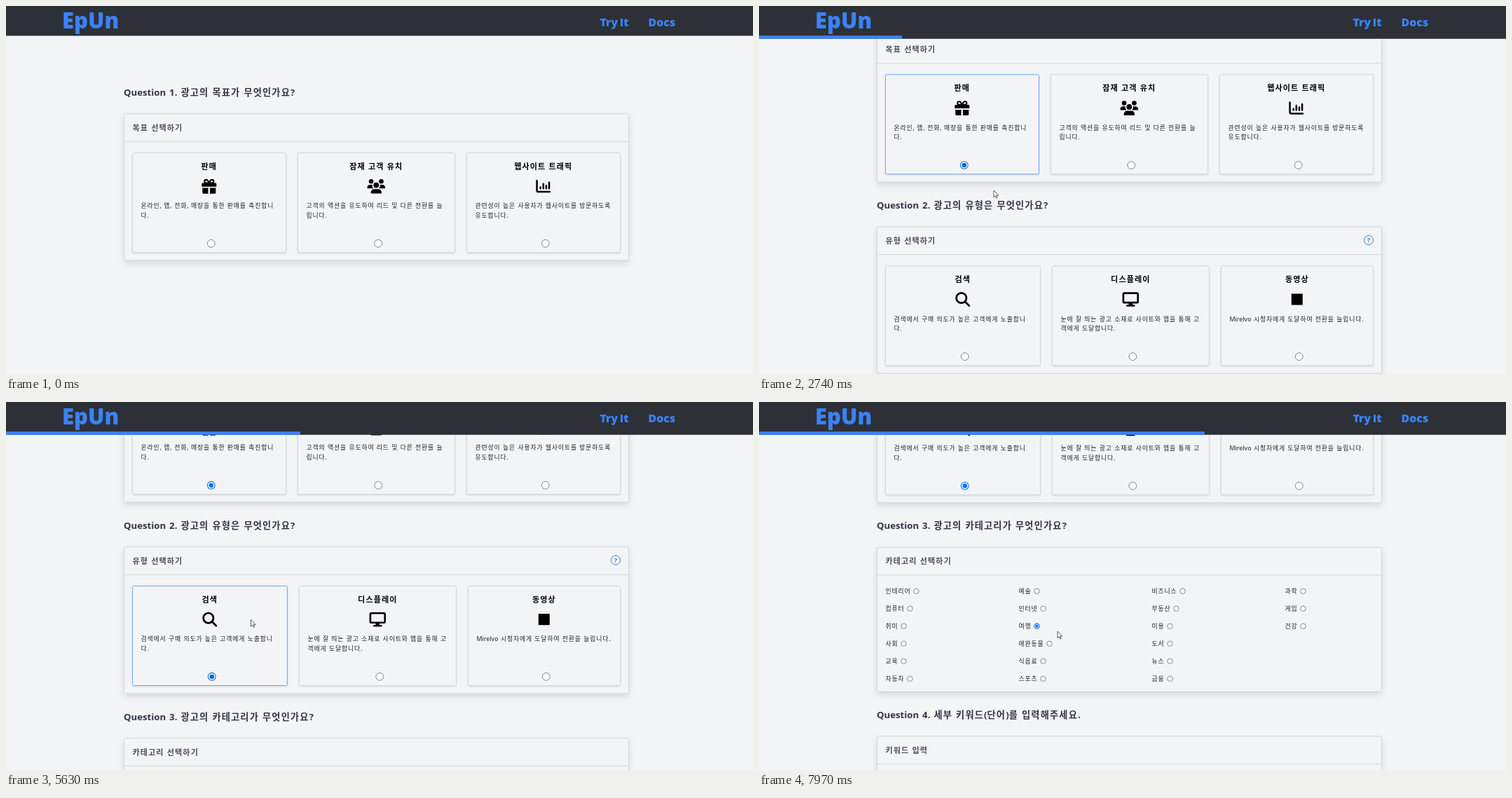
An HTML page for the animation above (8 s loop, 1066 by 525 pixels).

```html
<!DOCTYPE html>
<html lang="ko">
<head>
<meta charset="utf-8">
<title>Ad script survey</title>
<style>
html, body { margin: 0; width: 100%; height: 100%; overflow: hidden; background: #f3f4f6; }
svg { display: block; }
text { font-family: "Noto Sans", "Noto Sans CJK KR", sans-serif; word-spacing: .12em; white-space: pre; }
.ko { letter-spacing: .096em; }
.heading { font-size: 13.2px; font-weight: 600; fill: #2d3748; }
.heading .ko { letter-spacing: .09em; }
.title { font-size: 11.1px; font-weight: 600; fill: #465060; }
.name { font-size: 11.1px; font-weight: 700; text-anchor: middle; }
.body { font-size: 8.88px; fill: #1f2328; }
.box { fill: #f3f4f6; stroke: #d5d8dd; }
.panel { filter: drop-shadow(0 4px 4px rgba(0,0,0,.11)); }
.card .box { filter: drop-shadow(0 1.5px 1.2px rgba(0,0,0,.12)); }
.card.hover .box { stroke: #6ea9f7; }
.ring { fill: #fff; stroke: #767676; stroke-width: .9; }
.dot { fill: #0075ff; display: none; }
.on .ring { stroke: #0075ff; stroke-width: 1.1; }
.on .dot { display: inline; }
.hover .on .ring { stroke: #1168d4; }
.hover .on .dot { fill: #1168d4; }
.line { fill: none; stroke: #000; stroke-linecap: round; stroke-linejoin: round; }
.brand { font-family: "Open Sans", "Noto Sans", sans-serif; font-weight: 800; word-spacing: -.1em; fill: #3b82f6; }
</style>
</head>
<body>
<svg id="stage" width="1066" height="525" viewBox="0 0 1066 525"></svg>
<script>
const LOOP = 8000;
const TOPS = [0, 273, 546, 815.5];
const FOOTER_TOPS = [658.5, 658.5, 928.5, 1198.5];

const ICONS = {
  gift: `<path d="M-9.2-4.6H9.2Q10.5-4.6 10.5-3.3V.6H-10.5V-3.3Q-10.5-4.6-9.2-4.6ZM-9.5 2.4H-1.3V10.5H-8Q-9.5 10.5-9.5 9ZM1.3 2.4H9.5V9Q9.5 10.5 8 10.5H1.3Z"/>
    <path class="line" stroke-width="2.1" d="M0-4.6H-4.2A2.3 2.3 0 0 1-4.2-9.3Q-2-9.5 0-4.6Q2-9.5 4.2-9.3A2.3 2.3 0 0 1 4.2-4.6Z"/>`,
  users: `<circle cx="-7.2" cy="-6.9" r="3.3"/><circle cx="7.2" cy="-6.9" r="3.3"/><circle cy="-1.6" r="3.9"/>
    <path d="M-12.8 2.2Q-12.8-2.3-8.5-2.3H-5.6Q-6 .6-4 3H-12Q-12.8 3-12.8 2.2ZM12.8 2.2Q12.8-2.3 8.5-2.3H5.6Q6 .6 4 3H12Q12.8 3 12.8 2.2ZM-7.7 9.4Q-7.5 4-2.5 4H2.5Q7.5 4 7.7 9.4Q7.7 10.4 6.7 10.4H-6.7Q-7.7 10.4-7.7 9.4Z"/>`,
  chart: `<path class="line" stroke-width="2.5" d="M-9.2-7.9V5.8Q-9.2 7.9-7.1 7.9H9.2M-4.2 3V1.2M0 3V-3.4M4.2 3V-1M8.3 3V-5.4"/>`,
  search: `<path class="line" stroke-width="2.7" d="M5.2-2A7.2 7.2 0 1 1-9.2-2A7.2 7.2 0 1 1 5.2-2ZM3.2 3.2L9.1 9.1"/>`,
  screen: `<path class="line" stroke-width="2.6" d="M-9.2-8.9H9.2Q10.4-8.9 10.4-7.7V3.4Q10.4 4.6 9.2 4.6H-9.2Q-10.4 4.6-10.4 3.4V-7.7Q-10.4-8.9-9.2-8.9ZM-5 9H5"/>
    <path d="M-2.4 4H2.4L3 9H-3Z"/>`,
  square: `<rect x="-8" y="-8" width="16" height="16"/>`
};

const GOALS = [
  [180, 219, '판매', 'gift', '온라인, 앱, 전화, 매장을 통한 판매를 촉진합니', '다.'],
  [416, 224, '잠재 고객 유치', 'users', '고객의 액션을 유도하여 리드 및 다른 전환를 늘', '립니다.'],
  [657, 219, '웹사이트 트래픽', 'chart', '관련성이 높은 사용자가 웹사이트를 방문하도록', '유도합니다.']
];
const TYPES = [
  [180, 221, '검색', 'search', '검색에서 구매 의도가 높은 고객에게 노출합니', '다.'],
  [418, 224, '디스플레이', 'screen', '눈에 잘 띄는 광고 소재로 사이트와 앱을 통해 고', '객에게 도달합니다.'],
  [659, 217, '동영상', 'square', 'Mirelvo 시청자에게 도달하여 전환을 늘립니다.', '']
];
const CATEGORIES = [
  '인테리어 컴퓨터 취미 사회 교육 자동차',
  '예술 인터넷 여행 애완동물 식음료 스포츠',
  '비즈니스 부동산 미용 도서 뉴스 금융',
  '과학 게임 건강'
];

const text = (x, y, cls, str, attrs = '') =>
  `<text x="${x}" y="${y}" class="${cls}" ${attrs}>${str.replace(/[가-힣]+/g, '<tspan class="ko">$&</tspan>')}</text>`;
const rect = (x, y, w, h, attrs) => `<rect x="${x}" y="${y}" width="${w}" height="${h}" ${attrs}/>`;
const radio = (id, x, y, r) =>
  `<g id="radio-${id}"><circle class="ring" cx="${x}" cy="${y}" r="${r}"/><circle class="dot" cx="${x}" cy="${y}" r="${r * .62}"/></g>`;

function card(q, [x, w, name, icon, line1, line2], i) {
  const mid = x + w / 2 + .3;
  return `<g class="card" id="card-${q}-${i}">` +
    rect(x + .5, 209.5, w, 142, 'rx="2" class="box"') +
    text(mid, 233, 'name', name) +
    `<g transform="translate(${mid} 257.2)">${ICONS[icon]}</g>` +
    text(x + 12.5, 288.3, 'body', line1) + text(x + 12.5, 301.8, 'body', line2) +
    radio(`${q}-${i}`, mid + 3, 338.8, 5.4) + '</g>';
}

const categoryList = CATEGORIES.map((names, col) => names.split(' ').map((name, row) => {
  const x = 180.5 + col * 190, y = 216 + row * 25;
  return text(x, y + 3.3, 'body', name) + radio(`2-${col}-${row}`, x + 8 + 9 * name.length, y, 3.7);
}).join('')).join('');

const question = (q, heading, title, height, content) =>
  `<g id="question-${q}">` +
  text(168, 127.5, 'heading', `Question ${q + 1}. ${heading}`) +
  rect(168.5, 153.7, 720, height, 'rx="2" class="box panel"') +
  text(180.5, 177.6, 'title', title) +
  '<path d="M169 193.3H888" stroke="#d5d8dd"/>' + content + '</g>';

const help = '<circle cx="870" cy="172.7" r="6.6" fill="none" stroke="#3b82c8"/>' +
  text(870, 176.2, '', '?', 'text-anchor="middle" font-size="9.5" font-weight="600" fill="#3b82c8"');

const footer = '<g id="footer">' + rect(0, 0, 1066, 90, 'fill="#2d3037"') +
  text(1.5, 31.8, '', 'Automatically', 'font-size="15.9" font-weight="600" fill="#3b82f6"') +
  text(1.5, 50.5, '', 'generate advertising scripts', 'font-size="12.85" fill="#d7dae0"') +
  text(1.5, 71.5, '', 'using', 'font-size="12.85" fill="#3b82f6"') +
  text(39.5, 71.5, '', 'VelmORT', 'font-size="15.9" font-weight="600" fill="#3b82f6"') +
  '<path d="M207.5 14.5V74.5" stroke="#a3a7ae"/>' +
  text(241, 38.8, '', 'VelmORT 연동 프로젝트 입니다 :)', 'font-size="10.9" font-weight="600" fill="#eceef1"') +
  text(253, 62.5, '', 'Copyright 2023. Filrit All rights reserved.', 'font-size="7.7" fill="#eceef1"') + '</g>';

const header = rect(0, 0, 1066, 42.5, 'id="header" fill="#2d3037"') +
  rect(0, 42.2, 0, 4.6, 'id="bar" fill="#3b82f6"') +
  text(80, 32, 'brand', 'EpUn', 'font-size="31"') +
  text(847.5, 29, 'brand', 'Try It', 'font-size="15.9"') +
  text(916.5, 29, 'brand', 'Docs', 'font-size="15.9"');

document.getElementById('stage').innerHTML =
  rect(0, 0, 1066, 525, 'fill="#f3f4f6"') + '<g id="page">' +
  question(0, '광고의 목표가 무엇인가요?', '목표 선택하기', 209, GOALS.map((c, i) => card(0, c, i)).join('')) +
  question(1, '광고의 유형은 무엇인가요?', '유형 선택하기', 209, help + TYPES.map((c, i) => card(1, c, i)).join('')) +
  question(2, '광고의 카테고리가 무엇인가요?', '카테고리 선택하기', 205.5, categoryList) +
  question(3, '세부 키워드(단어)를 입력해주세요.', '키워드 입력', 209, '') +
  footer + '</g>' + header +
  '<path id="cursor" d="M0 0V9.8L2.3 7.7L3.8 11L5.2 10.4L3.8 7.1H6.8Z" fill="#fff" stroke="#30343a" stroke-width=".8"/>';

const $ = id => document.getElementById(id);
const clamp = v => Math.min(1, Math.max(0, v));
const smooth = v => v * v * (3 - 2 * v);
const easeOut = v => 1 - (1 - v) ** 2;
const linear = v => v;

// Interpolates rows of [time, ...values].
function track(keys, t, ease = linear) {
  const next = keys.findIndex(k => k[0] > t);
  if (next === 0) return keys[0].slice(1);
  if (next < 0) return keys[keys.length - 1].slice(1);
  const a = keys[next - 1], b = keys[next];
  const p = ease((t - a[0]) / (b[0] - a[0]));
  return a.slice(1).map((v, i) => v + (b[i + 1] - v) * p);
}

const CLICKS = [1880, 5220, 7450];
const CHECKED = ['0-0', '1-0', '2-1-2'];
const ENTER = [0, 1940, 5225, 7530];
const SCROLL = [[2430, 0], [2670, 111.7], [2740, 111.7], [2980, 167], [3220, 220],
  [5830, 220], [6070, 330], [6320, 490], [7529, 490], [7530, 492.2]];
const CURSOR = [[130, 1020, 518], [400, 850, 350], [640, 600, 290], [930, 402, 276], [970, 388, 272], [1110, 335, 263],
  [3640, 335, 263], [3950, 440, 300], [4300, 581, 328], [4840, 581, 328], [5020, 349.5, 310.5],
  [6320, 349.5, 310.5], [6560, 297, 315], [6609, 297, 315], [6610, 325, 330], [6640, 327, 332],
  [6880, 360, 344], [7120, 398, 330], [7320, 397, 320], [7600, 397, 320], [7900, 426, 327]];
const BAR = [[1880, 204], [5220, 204], [5470, 420], [7450, 420], [7700, 636]];
const HOVER = [[0, ''], [400, '0-2'], [585, ''], [605, '0-1'], [930, ''], [970, '0-0'], [2820, ''], [3260, '1-0'],
  [3840, ''], [3900, '1-1'], [4890, ''], [4990, '1-0'], [5900, '']];

const cards = [...document.querySelectorAll('.card')];

function draw(t) {
  const stage = CLICKS.filter(c => t >= c).length;
  const [scroll] = track(SCROLL, t, smooth);
  $('page').setAttribute('transform', `translate(0 ${-scroll})`);

  TOPS.forEach((top, q) => {
    const p = q ? easeOut(clamp((t - ENTER[q]) / 400)) : 1;
    $(`question-${q}`).setAttribute('transform', `translate(${-200 * (1 - p)} ${top})`);
    $(`question-${q}`).setAttribute('opacity', p);
  });
  CHECKED.forEach((id, i) => $(`radio-${id}`).classList.toggle('on', stage > i));

  const hovered = HOVER.filter(h => t >= h[0]).pop()[1];
  cards.forEach(c => c.classList.toggle('hover', c.id === `card-${hovered}`));

  $('footer').setAttribute('transform', `translate(0 ${FOOTER_TOPS[stage]})`);
  $('header').setAttribute('height', stage ? 46.8 : 42.5);
  $('bar').setAttribute('width', stage ? track(BAR, t, smooth)[0] : 0);

  $('cursor').setAttribute('transform', `translate(${track(CURSOR, t).join(' ')})`);
  $('cursor').setAttribute('visibility', t < 130 ? 'hidden' : 'visible');
}

const start = performance.now();
function tick() {
  draw((performance.now() - start) % LOOP);
  requestAnimationFrame(tick);
}
tick();
</script>
</body>
</html>
```
